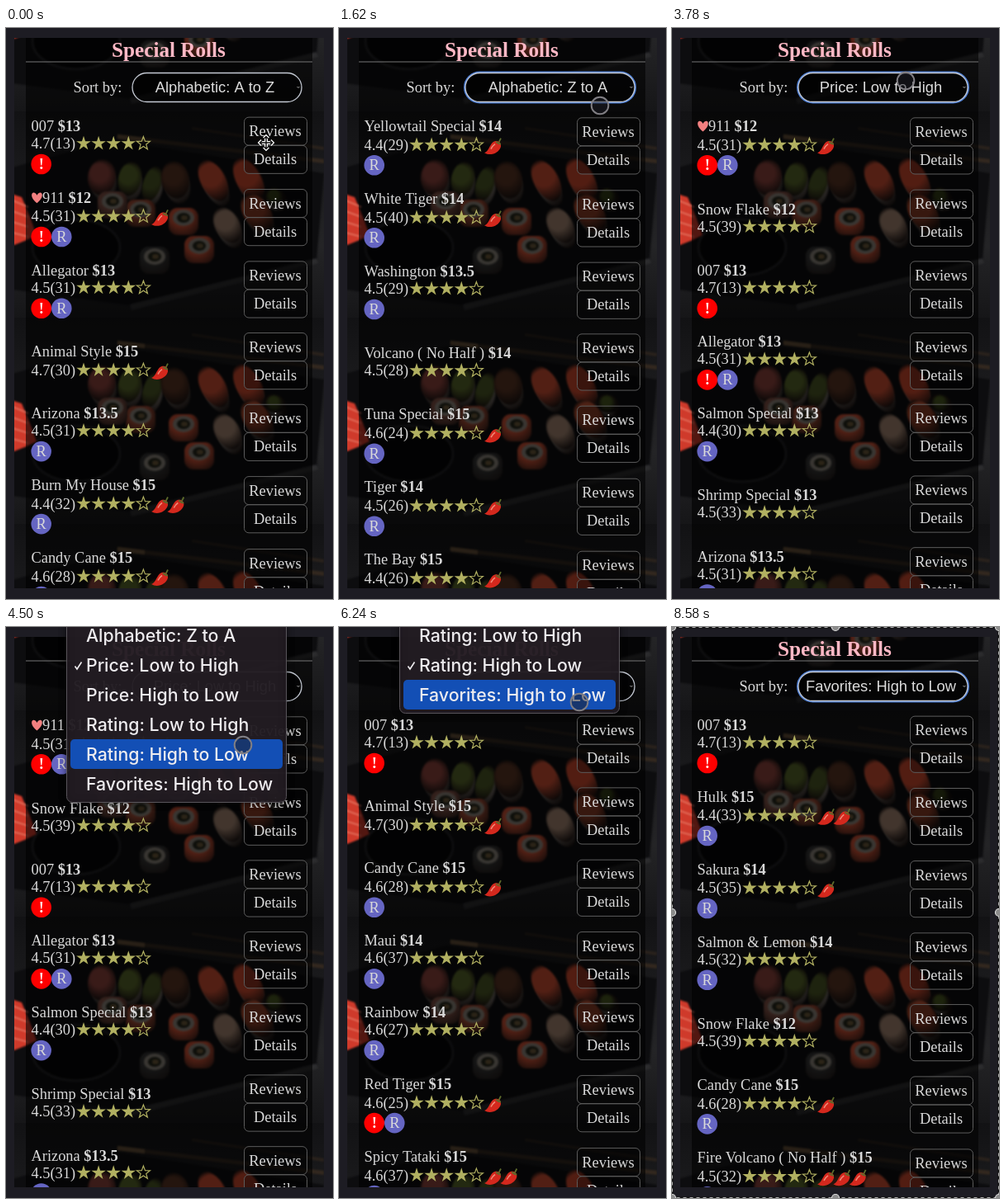
An HTML page with a canvas that plays this animation: 396x692 px, repeating every 8.64 s.

```html
<!DOCTYPE html>
<html lang="en">
<head>
<meta charset="utf-8">
<title>Special Rolls</title>
<style>
html, body { margin: 0; width: 100%; height: 100%; overflow: hidden; background: #1d1c23 }
canvas { display: block }
</style>
</head>
<body>
<canvas id="stage" width="396" height="692"></canvas>
<script>
const stage = document.getElementById('stage').getContext('2d');
let c = stage;
const LOOP = 8640;
const SERIF = '18.4px "Liberation Serif", Times, serif';
const SANS = '18.3px "Liberation Sans", Arial, sans-serif';
const MENU = '500 21.3px Inter, sans-serif';
const options = ['Alphabetic: A to Z', 'Alphabetic: Z to A', 'Price: Low to High', 'Price: High to Low',
  'Rating: Low to High', 'Rating: High to Low', 'Favorites: High to Low'];

// name | price | rating | badges | chilies
const rolls = Object.fromEntries(`007|13|4.7(13)|!|0
911|12|4.5(31)|!R|1
Allegator|13|4.5(31)|!R|0
Animal Style|15|4.7(30)||1
Arizona|13.5|4.5(31)|R|0
Burn My House|15|4.4(32)|R|2
Candy Cane|15|4.6(28)|R|1
Yellowtail Special|14|4.4(29)|R|1
White Tiger|14|4.5(40)|R|1
Washington|13.5|4.5(29)|R|0
Volcano ( No Half )|14|4.5(28)||0
Tuna Special|15|4.6(24)|R|1
Tiger|14|4.5(26)|R|1
The Bay|15|4.4(26)|R|1
Snow Flake|12|4.5(39)||0
Salmon Special|13|4.4(30)|R|0
Shrimp Special|13|4.5(33)||0
Maui|14|4.6(37)|R|0
Rainbow|14|4.6(27)|R|0
Red Tiger|15|4.6(25)|!R|1
Spicy Tataki|15|4.6(37)|R|2
Hulk|15|4.4(33)|R|2
Sakura|14|4.5(35)|R|1
Salmon & Lemon|14|4.5(32)|R|0
Fire Volcano ( No Half )|15|4.5(32)|R|3`.split('\n').map(line => {
  const [name, price, rating, badges, chilies] = line.split('|');
  return [name, { name, price, rating, badges, chilies: +chilies }];
}));

// time | order of the list
const lists = [
  [0, '007,911,Allegator,Animal Style,Arizona,Burn My House,Candy Cane'],
  [1440, 'Yellowtail Special,White Tiger,Washington,Volcano ( No Half ),Tuna Special,Tiger,The Bay'],
  [3240, '911,Snow Flake,007,Allegator,Salmon Special,Shrimp Special,Arizona'],
  [4800, '007,Animal Style,Candy Cane,Maui,Rainbow,Red Tiger,Spicy Tataki'],
  [7440, '007,Hulk,Sakura,Salmon & Lemon,Snow Flake,Candy Cane,Fire Volcano ( No Half )']
];
const picks = [[0, 0], [1440, 1], [3240, 2], [4800, 5], [6600, 6]];
const openTimes = [[780, 1440], [2220, 3240], [4020, 4800], [5820, 6600]];
const path = [[0, 315, 139], [300, 315, 139], [660, 312, 74], [840, 312, 74], [1200, 316, 94], [1680, 316, 94],
  [2100, 300, 72], [2340, 300, 72], [2700, 300, 91], [3300, 300, 91], [3660, 283, 64], [4080, 283, 64],
  [4500, 287, 143], [5160, 287, 143], [5640, 290, 72], [5940, 290, 72], [6240, 291, 91], [6660, 291, 91],
  [6960, 291, 132], [LOOP, 291, 132]];

const latest = (steps, t) => steps.filter(s => s[0] <= t).pop()[1];

function pointer(t) {
  const i = path.findIndex(k => k[0] > t), [t0, x0, y0] = path[i - 1], [t1, x1, y1] = path[i];
  const u = (t - t0) / (t1 - t0), e = u * u * (3 - 2 * u);
  return [x0 + (x1 - x0) * e, y0 + (y1 - y0) * e];
}

function text(s, x, y, font, color = '#d9d9d9', align = 'left') {
  c.font = font;
  c.fillStyle = color;
  c.textAlign = align;
  c.fillText(s, x, y);
  return c.measureText(s).width;
}

function shape(draw, fill, stroke, width = 1) {
  c.beginPath();
  draw();
  if (fill) { c.fillStyle = fill; c.fill(); }
  if (stroke) { c.strokeStyle = stroke; c.lineWidth = width; c.stroke(); }
}
const oval = (x, y, rx, ry, fill, turn = 0, stroke, width) =>
  shape(() => c.ellipse(x, y, rx, ry, turn, 0, 7), fill, stroke, width);
const box = (x, y, w, h, r, fill, stroke, width) =>
  shape(() => c.roundRect(x, y, w, h, r), fill, stroke, width);
const poly = (points, fill, stroke, width) =>
  shape(() => { points.forEach(p => c.lineTo(...p)); c.closePath(); }, fill, stroke, width);

// lit from the upper left, falling off into shadow
function glow(x, y, r, color) {
  const g = c.createRadialGradient(x - r / 4, y - r / 2, 0, x, y, r);
  g.addColorStop(0, color);
  g.addColorStop(.5, color);
  g.addColorStop(1, '#1a1210');
  return g;
}

function paintPlatter() {
  const shade = c.createLinearGradient(0, 0, 0, 250);
  shade.addColorStop(0, '#121214');
  shade.addColorStop(.65, '#242426');
  shade.addColorStop(1, '#161618');
  c.fillStyle = shade;
  c.fillRect(0, 0, 396, 250);
  c.filter = 'blur(1px)';
  poly([[0, 70], [130, 35], [385, 75], [376, 180], [150, 235], [0, 215]], '#0d0d0f');
  poly([[376, 178], [378, 184], [152, 241], [150, 234]], '#2c2c2e');
  poly([[135, 28], [385, 58], [385, 63], [135, 33]], '#33281f');
  poly([[135, 28], [168, 32], [168, 37], [135, 33]], '#655038');
  poly([[225, 19], [385, 43], [385, 47], [225, 22]], '#2a221c');
  oval(85, 165, 53, 34, '#060607', 0, '#222225', 3);
  poly([[0, 98], [19, 104], [29, 128], [37, 150], [25, 156], [10, 162], [0, 160]], '#cf3a2b');
  for (let i = 0; i < 4; i++) poly([[8, 108 + 13 * i], [27, 116 + 12 * i]], null, '#e57864', 1.5);
  // nigiri and topped pieces
  [[116, 80, 17, 22, '#8e433c', .1], [150, 82, 14, 21, '#59682a', .2], [177, 88, 11, 22, '#4c5825', .3],
   [205, 83, 17, 23, '#5a3423', -.2], [251, 84, 15, 27, '#cf4f33', -.5], [294, 83, 15, 29, '#cf4a2e', -.5],
   [325, 104, 14, 11, '#485720', .3], [268, 138, 15, 23, '#a58672', -.5], [304, 123, 16, 26, '#c55535', -.6]]
    .forEach(([x, y, rx, ry, color, turn]) => {
      oval(x + 3, y + 8, rx - 2, ry - 2, glow(x, y + 8, ry, '#77706a'), turn);
      oval(x, y, rx, ry, glow(x, y, ry, color), turn);
    });
  [[163, 122, '#a04a33'], [215, 132, '#cc5034'], [180, 179, '#343434'], [234, 166, '#cc5034'], [129, 112, '#805044']]
    .forEach(([x, y, color]) => {
      box(x - 18, y - 15, 36, 33, 11, glow(x, y, 27, color));
      oval(x, y - 3, 13, 10, '#8e877d');
      oval(x, y - 3, 8, 6, '#23251a');
      oval(x + 1, y - 3, 4, 3, '#6d5a3a');
    });
}

const platter = new OffscreenCanvas(396, 250);
c = platter.getContext('2d');
paintPlatter();
c = stage;

function star(x, y, solid) {
  const points = Array.from({ length: 10 }, (_, i) => {
    const a = i * Math.PI / 5 - Math.PI / 2, r = i % 2 ? 3.5 : solid ? 9.2 : 8.4;
    return [x + r * Math.cos(a), y + r * Math.sin(a)];
  });
  poly(points, solid && '#b1b061', solid ? null : '#b1b061', 1.2);
}

function chili(x, y) {
  c.save();
  c.translate(x, y);
  shape(() => {
    c.moveTo(0, 8.5);
    c.bezierCurveTo(5, 7, 6, 0, 10, -4);
    c.bezierCurveTo(14, -8, 21, -5, 20, 1);
    c.bezierCurveTo(18, 9, 7, 13, 0, 8.5);
  }, '#d4281d');
  shape(() => { c.moveTo(8, 4); c.quadraticCurveTo(10, 0, 13, -2); }, null, '#f08a78', 1.6);
  shape(() => { c.moveTo(14, -5); c.quadraticCurveTo(17, -2, 20, -2); c.moveTo(17.5, -4); c.lineTo(20, -9); }, null, '#5d6b2c', 1.8);
  c.restore();
}

function heart(x, y) {
  shape(() => {
    c.moveTo(x, y + 6.5);
    c.bezierCurveTo(x - 12, y - 3, x - 4, y - 11, x, y - 3);
    c.bezierCurveTo(x + 4, y - 11, x + 12, y - 3, x, y + 6.5);
  }, '#f28080');
}

function button(label, y) {
  box(288.5, y - 17, 76, 34, 5.5, 'rgba(0,0,0,.3)', '#5c5c5c');
  text(label, 326, y + 6, SERIF, '#d9d9d9', 'center');
}

function row(roll, top) {
  const { name, price, rating, badges, chilies } = roll;
  const height = badges && chilies ? 88 : 86.7, mid = top + height / 2;
  const nameY = top + (badges ? 20 : chilies ? 31.5 : 32.5);
  const rateY = nameY + (chilies ? 22.7 : 21);
  let x = 30.5;
  if (name === '911') { heart(37.5, nameY); x += 13.5; }
  x += text(name + ' ', x, nameY + 6, SERIF);
  text('$' + price, x, nameY + 6, 'bold ' + SERIF);
  text(rating, 30.5, rateY + 6, SERIF);
  for (let i = 0; i < 5; i++) star(94 + 18.1 * i, rateY, i < 4);
  for (let i = 0; i < chilies; i++) chili(176 + 19.3 * i, rateY + 1);
  [...badges].forEach((mark, i) => {
    const bx = 42.7 + 24.6 * i, by = top + (chilies ? 67.3 : 66);
    oval(bx, by, 12.3, 12.3, mark === '!' ? '#f00' : '#6565c2');
    text(mark, bx, by + 6, mark === '!' ? 'bold ' + SERIF : SERIF, mark === '!' ? '#fff' : '#d9d9d9', 'center');
  });
  button('Reviews', mid - 17.2);
  button('Details', mid + 17);
  return top + height;
}

function menu(chosen, y) {
  const first = 46 - 36 * chosen, hover = Math.max(0, Math.min(6, Math.round((y - first) / 36)));
  c.save();
  c.shadowColor = 'rgba(0,0,0,.6)';
  c.shadowBlur = 8;
  box(73.5, first - 22.5, 266, 261, 7, 'rgba(36,30,36,.92)', '#59555b');
  c.restore();
  box(78, first + 36 * hover - 18, 257, 36, 5, '#134fb5');
  options.forEach((label, i) => text(label, 97, first + 36 * i + 7.8, MENU, '#eeecef'));
  shape(() => { c.moveTo(83.5, 47.5); c.lineTo(86, 51); c.lineTo(91.5, 42.5); }, null, '#eeecef', 1.6);
}

function moveCursor(x, y) {
  c.save();
  c.translate(x, y);
  for (const [color, width] of [['#fff', 4], ['#111', 1.5]]) {
    for (let i = 0; i < 4; i++) {
      c.rotate(Math.PI / 2);
      shape(() => { c.moveTo(0, 0); c.lineTo(7, 0); c.moveTo(5, -2.5); c.lineTo(7.5, 0); c.lineTo(5, 2.5); }, null, color, width);
    }
  }
  c.restore();
}

function selection() {
  c.strokeStyle = '#111';
  c.lineWidth = 2;
  c.strokeRect(.5, .5, 395, 691);
  c.setLineDash([4, 4]);
  c.strokeStyle = '#aaa';
  c.lineWidth = 1;
  c.strokeRect(.5, .5, 395, 691);
  c.setLineDash([]);
  for (const x of [0, 198, 396]) for (const y of [0, 346, 692])
    if (x !== 198 || y !== 346) oval(x, y, 4.5, 4.5, '#8c8c8c', 0, '#ddd', 1.2);
}

function draw(t) {
  const chosen = latest(picks, t), open = openTimes.some(([a, b]) => t >= a && t < b);
  const [px, py] = pointer(t), ended = t >= 8400;
  c.fillStyle = '#1d1c23';
  c.fillRect(0, 0, 396, 692);
  c.save();
  c.beginPath();
  c.rect(10, 12, 375, 667);
  c.clip();
  for (let i = 0; i < 4; i++) c.drawImage(platter, 0, -149 + 250 * i);
  c.fillStyle = 'rgba(0,0,0,.6)';
  c.fillRect(24, 12, 347, 668);

  text('Special Rolls', 197, 35, 'bold 25.2px "Liberation Serif", Times, serif', '#ffb9c6', 'center');
  c.fillStyle = '#777';
  c.fillRect(24, 40.5, 347, 1);
  text('Sort by:', 81.5, 78, SERIF);
  if (chosen && !open) box(152, 53.5, 207, 37, 18.5, null, '#4f80d6', 2);
  box(153, 54.5, 205, 35, 17.5, 'rgba(0,0,0,.6)', '#c3c8d2', 1.3);
  text(options[chosen], 253, 78.3, SANS, '#dcdcdc', 'center');
  shape(() => { c.moveTo(352.5, 71); c.lineTo(354, 72.5); c.lineTo(355.5, 71); }, null, '#aaa', 1);
  latest(lists, t).split(',').reduce((top, name) => row(rolls[name], top), 99);
  c.restore();

  if (open) menu(chosen, py);
  if (t < 360) moveCursor(px, py);
  else if (!ended) oval(px, py, 10.3, 10.3, 'rgba(30,30,38,.5)', 0, '#817f84', 2);
  if (ended) selection();
}

const start = performance.now();
function tick() {
  draw((performance.now() - start) % LOOP);
  requestAnimationFrame(tick);
}
tick();
</script>
</body>
</html>
```
